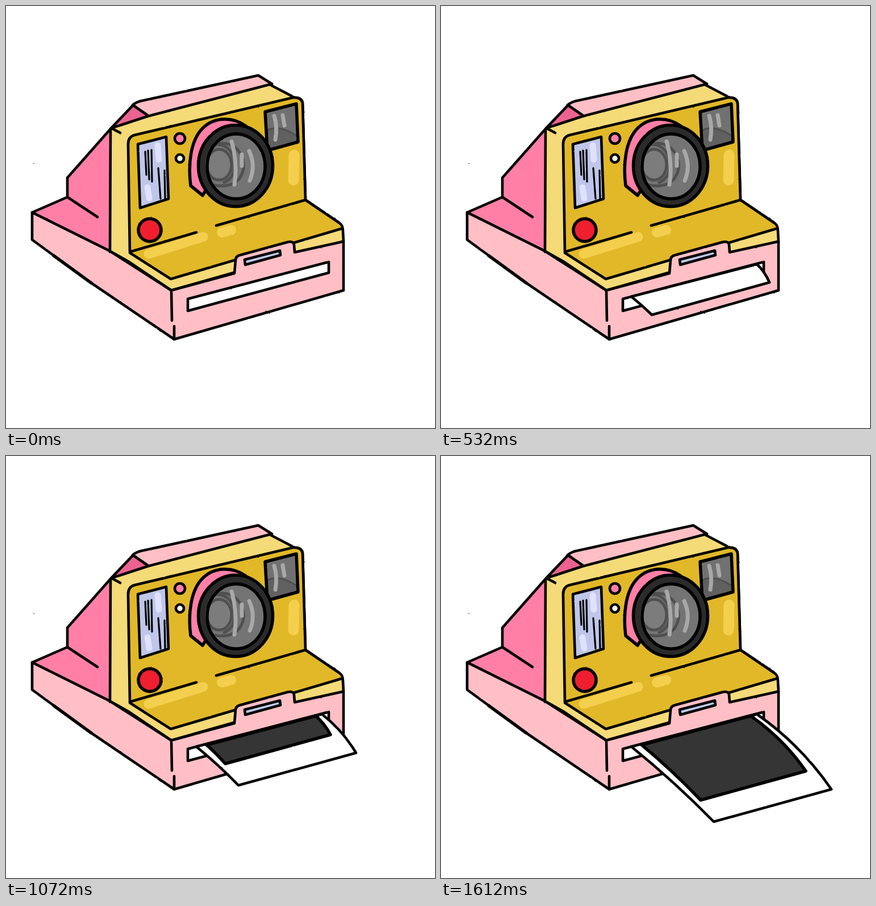
Recreate the animation shown at these times as an HTML page. Size 755 by 742 pixels, loop 1720 ms.

```html
<!DOCTYPE html>
<html lang="en">
<head>
<meta charset="utf-8">
<title>Instant camera</title>
<style>
  html, body { margin: 0; height: 100%; overflow: hidden; background: #fff; }
  svg { display: block; width: 100vw; height: 100vh; }
  .ink { stroke: #000; stroke-width: 4.6; stroke-linecap: round; stroke-linejoin: round; }
  .line { fill: none; }
  .bold { stroke-width: 5.5; }
  .glow { fill: none; stroke-linecap: round; stroke: #f4cf4e; }
  .pink { fill: #ffbfc5; }
  .hot { fill: #ff7fa7; }
  .cream { fill: #f5da78; }
  .gold { fill: #e1b828; }
  .dark { fill: #353535; }
  .shade { fill: none; stroke: #505050; stroke-width: 5; }
  .shine { fill: none; stroke: #a8a8a8; stroke-width: 7; stroke-linecap: round; }
  .step {
    visibility: hidden;
    animation: show 1720ms step-end infinite;
    animation-delay: calc(100ms + 270ms * var(--i) - 1720ms);
  }
  /* each step holds for 270 of 1720 ms */
  @keyframes show {
    0% { visibility: visible; }
    15.69767%, 100% { visibility: hidden; }
  }
</style>
</head>
<body>
<svg viewBox="0 0 755 742">
  <defs>
    <filter id="rough" filterUnits="userSpaceOnUse" x="0" y="0" width="755" height="742" color-interpolation-filters="sRGB">
      <feTurbulence type="fractalNoise" baseFrequency=".13" numOctaves="2" seed="4"/>
      <feDisplacementMap in="SourceGraphic" scale="1.6" xChannelSelector="R" yChannelSelector="G"/>
    </filter>
  </defs>

  <g filter="url(#rough)">
    <circle cx="49" cy="277" r=".8"/>

    <!-- back and base -->
    <path class="ink hot" d="M46 363L108 336V302L184 216L225 173L250 192L240 440L183 431Z"/>
    <path fill="#ec6291" d="M192 208L225 173L252 192V206Z"/>
    <path class="ink line" d="M184 216L225 173"/>
    <path class="ink pink" d="M291 500L183 431L46 363V411L150 487L296 586"/>
    <path class="ink line bold" d="M84 439L150 487"/>
    <path class="ink line" d="M108 336L161 371"/>
    <path class="ink pink" d="M249 192L223 174Q230 168 242 166L444 122L468 137"/>

    <!-- front shell -->
    <path class="ink cream" d="M184 217Q188 213 200 210L249 194L464 138L508 161Q521 161 522 171L527 341L586 381Q593 386 593 396L594 414L291 500L215 449L183 431Z"/>
    <path class="ink line" d="M186 215L201 223"/>
    <path class="ink gold" d="M218 434L215 246Q214 230 226 227L505 161Q520 160 522 171L527 341L586 381Q593 386 592 391L290 480Z"/>
    <path class="ink line" d="M219 432L335 398M370 386L527 341"/>
    <path class="glow" stroke-width="17" d="M251 436L347 406"/>
    <path class="glow" stroke-width="18" d="M380 398L396 394"/>
    <path class="glow" stroke-width="19" d="M507 262L506 306"/>

    <!-- lower front -->
    <path fill="#ffbfc5" d="M291 500L402 470L404 447Q404 440 412 438L496 415Q506 413 507 420L508 433L594 414V500L296 586Z"/>
    <path class="ink line" d="M291 500L402 470L404 447Q404 440 412 438L496 415Q506 413 507 420L508 433L594 414V500L296 586V563M291 500L292 553"/>
    <path class="ink" fill="#c0c9ec" d="M420 446L482 430L483 438L421 455Z"/>
    <path class="ink" fill="#fff" d="M320 515L568 450V469L320 536Z"/>

    <!-- flash label and buttons -->
    <path fill="#bfc6e9" d="M232 243L282 230L286 339L236 355Z"/>
    <path class="glow" style="stroke:#dfe1fd" stroke-width="11" d="M267 245L269 270M249 319L252 338"/>
    <path class="ink line" d="M232 243L282 230L286 339L236 355Z"/>
    <path class="ink line" style="stroke-width:3.2" d="M245 256L247 297M250 254L252 305M256 253L257 309M268 285L272 339M279 289L280 338"/>
    <circle class="ink hot" cx="306" cy="233" r="9"/>
    <circle class="ink" fill="#fff" cx="306" cy="268" r="7"/>
    <circle class="ink bold" fill="#ef1f2f" cx="253" cy="394" r="20"/>

    <!-- viewfinder -->
    <path fill="#717171" d="M456 186L511 172L514 239L460 254Z"/>
    <path fill="#606060" d="M458 220Q480 209 513 228L514 239L460 254Z"/>
    <path class="shade" style="stroke-width:3" d="M459 219Q480 207 513 229"/>
    <path class="shine" d="M472 193Q478 213 474 235M487 192L490 210"/>
    <path class="ink line bold" d="M456 186L511 172L514 239L460 254Z"/>

    <!-- lens -->
    <path class="ink hot bold" d="M422 211C400 195 368 194 347 214C325 235 320 277 325 316L346 333Z"/>
    <ellipse class="ink bold" fill="#2b2b2b" cx="404" cy="281" rx="65.5" ry="71.5"/>
    <ellipse fill="#747474" cx="405" cy="282" rx="51" ry="57"/>
    <path class="shade" d="M366 243Q399 235 414 262Q424 284 411 303Q394 322 362 314"/>
    <ellipse class="shade" style="fill:#7c7c7c" cx="375" cy="279" rx="22" ry="27"/>
    <path class="shade" d="M366 244C391 240 405 262 402 286Q399 305 382 311"/>
    <path class="shine" d="M397 238Q408 277 402 314M415 261V281M428 255Q440 281 429 307"/>
    <ellipse class="ink line bold" cx="405" cy="282" rx="51" ry="57"/>
  </g>

  <g id="print" filter="url(#rough)"></g>
</svg>
<script>
  // lower left corner of the print at each step
  const tips = [[349, 527], [371, 543], [388, 560], [409, 579], [447, 615], [480, 643]];

  // sheet hanging from a top edge, with bowed sides
  function sheet(left, right, tip, w, h) {
    const end = [tip[0] + w, tip[1] - h];
    const bow = (a, b, k) => {
      const d = (b[1] - a[1]) * k;
      return `${(a[0] + b[0]) / 2 + d},${(a[1] + b[1]) / 2 - d}`;
    };
    return `M${left}Q${bow(left, tip, 0.03)} ${tip}L${end}Q${bow(right, end, 0.09)} ${right}Z`;
  }

  const path = (cls, fill, d) => `<path class="ink ${cls}" fill="${fill}" d="${d}"/>`;

  document.getElementById("print").innerHTML = tips.map((tip, i) => {
    const [left, right] = i ? [[335, 511], [556, 454]] : [[334, 512], [547, 456]];
    let out = path("", "#fff", sheet(left, right, tip, i ? 207 : 210, 57));
    if (i > 1) {
      const inner = [tip[0] - 23, tip[1] - 38];
      out += path("dark bold", "#353535", sheet([353, 508], [545, 457], inner, 185, 51));
    }
    return `<g class="step" style="--i:${i}">${out}</g>`;
  }).join("");
</script>
</body>
</html>
```
